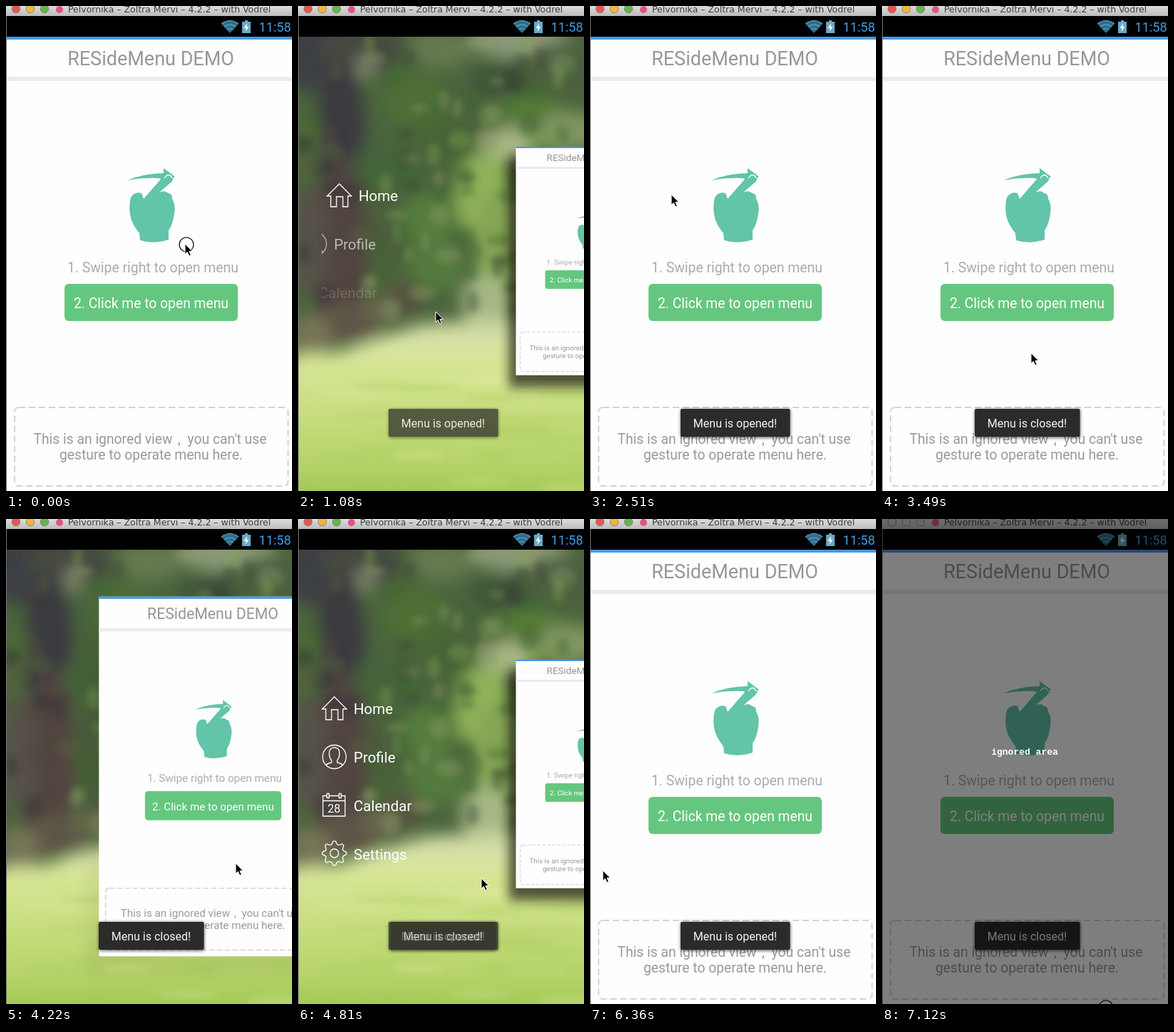
These frames come from a looping animation (401x679 px, 8 s). An HTML page:

```html
<!DOCTYPE html>
<html lang="en">
<head>
<meta charset="utf-8">
<title>Side menu demo</title>
<style>
  html, body { margin: 0; width: 100%; height: 100%; overflow: hidden; background: #fff; }
  svg { position: absolute; left: 0; top: 0; width: 401px; height: 679px; font-family: Roboto, sans-serif; }
  #wood { will-change: transform; }
  .mid { text-anchor: middle; }
  .line { fill: none; stroke: #fff; stroke-width: 1.3; }
</style>
</head>
<body>
<svg id="wood" viewBox="0 0 401 679">
  <defs>
    <linearGradient id="grass" gradientUnits="userSpaceOnUse" x1="0" x2="0" y1="430" y2="679">
      <stop offset="0" stop-color="#bfca9c"/>
      <stop offset=".18" stop-color="#dae5a6"/>
      <stop offset=".3" stop-color="#d5e592"/>
      <stop offset=".55" stop-color="#c8de7f"/>
      <stop offset=".85" stop-color="#b5d367"/>
      <stop offset="1" stop-color="#a3ca58"/>
    </linearGradient>
    <filter id="soft" x="-20%" y="-20%" width="140%" height="140%"><feGaussianBlur stdDeviation="11"/></filter>
    <filter id="fine" x="-20%" y="-20%" width="140%" height="140%"><feGaussianBlur stdDeviation="5"/></filter>
  </defs>
  <rect width="401" height="679" fill="#4a643c"/>
  <g filter="url(#soft)">
    <g id="trees"></g>
    <path d="M-60 492L60 484 120 462 180 444 300 436 460 436V760H-60Z" fill="url(#grass)"/>
  </g>
  <g id="leaves" filter="url(#fine)"></g>
  <g id="blades" filter="url(#fine)"></g>
</svg>

<svg id="stage" viewBox="0 0 401 679">
  <defs>
    <clipPath id="listBox"><rect x="33" y="230" width="260" height="270"/></clipPath>
    <linearGradient id="bar" x2="0" y2="1"><stop offset="0" stop-color="#dcdcdc"/><stop offset="1" stop-color="#bcbcbc"/></linearGradient>
    <filter id="shade" x="-20%" y="-20%" width="140%" height="140%"><feGaussianBlur stdDeviation="15"/></filter>
    <filter id="glow" x="-20%" y="-40%" width="140%" height="180%"><feGaussianBlur stdDeviation="2"/></filter>
  </defs>

  <g clip-path="url(#listBox)" id="list" fill="#fff" font-size="20.5">
    <g>
      <path class="line" d="M34 266L51 249 68 266H63V281H56V267H47V281H39V266Z"/>
      <text x="78" y="273">Home</text>
    </g>
    <g>
      <circle class="line" cx="51" cy="333" r="16.5"/>
      <path class="line" d="M39 345Q41 342 47 341V338Q43 333 44 326Q45 320 51 320T58 326Q59 333 55 338V341Q61 342 63 345"/>
      <text x="78" y="341">Profile</text>
    </g>
    <g>
      <path class="line" d="M35 387.500H40M44 387.500H57M61 387.500H66V416H35V387M35 394.500H66M40.500 384.500h3v6h-3zM57.500 384.500h3v6h-3z"/>
      <text class="mid" x="50.500" y="411" font-size="16">28</text>
      <text x="78" y="409">Calendar</text>
    </g>
    <g>
      <path class="line" id="gear"/>
      <circle class="line" cx="51" cy="468" r="6"/>
      <text x="78" y="477">Settings</text>
    </g>
  </g>

  <g id="panel">
    <rect id="shadow" x="-20" y="72" width="460" height="645" fill="#15160c" filter="url(#shade)"/>
    <rect y="43" width="406" height="640" fill="#fefefe"/>
    <rect y="43" width="406" height="4" fill="#4a98e6"/>
    <rect y="99" width="406" height="6" fill="#ebebeb"/>
    <text class="mid" x="203" y="83" font-size="27" fill="#979797">RESideMenu DEMO</text>
    <g fill="#62c4a9">
      <path d="M170 244Q195 234 221 234L221 227 237 239 226 245 214 241Q192 240 170 244Z"/>
      <path d="M220 239Q229 232 234 238 236 243 230 248L215 261Q223 257 227 262 233 262 233 270 238 278 236 290 234 306 228 314L228 327Q207 334 188 328L187 318Q176 305 174 292 172 279 175 268 181 259 190 262L193 270Z"/>
      <path d="M222 241Q228 232 233 241" fill="none" stroke="#fff" stroke-width="1.300"/>
    </g>
    <text class="mid" x="206" y="373" font-size="19.400" fill="#ababab">1. Swipe right to open menu</text>
    <rect id="button" x="82" y="389" width="243" height="52" rx="6"/>
    <text class="mid" x="203.500" y="423" font-size="19.300" fill="#fff">2. Click me to open menu</text>
    <rect x="12" y="562" width="383.500" height="110" rx="6" fill="none" stroke="#d3d3d3" stroke-width="2" stroke-dasharray="9 5"/>
    <g font-size="19.300" fill="#999">
      <text x="38.500" y="613">This is an ignored view</text>
      <text x="241" y="613">,</text>
      <text x="254.500" y="613">you can't use</text>
      <text class="mid" x="203.500" y="635">gesture to operate menu here.</text>
    </g>
  </g>

  <rect y="14" width="401" height="29"/>
  <rect width="401" height="14" fill="url(#bar)"/>
  <g id="lights" stroke="#777" stroke-width=".8">
    <circle cx="14" cy="4" r="5.800"/><circle cx="34" cy="4" r="5.800"/><circle cx="54" cy="4" r="5.800"/>
  </g>
  <circle cx="75" cy="5" r="5" fill="#e0528d"/>
  <text x="87" y="9" font-size="12.500" fill="#3c3c3c" style="font-family:'DejaVu Sans',sans-serif">Pelvornika – Zoltra Mervi – 4.2.2 – with Vodrel</text>
  <path d="M302 25Q314 16 326 25L314 38Z" fill="#2c6e90"/>
  <path d="M302 25Q314 16 326 25M306 29Q314 23 322 29M310 33Q314 30 318 33" fill="none" stroke="#6fa9c4" stroke-width="1.200"/>
  <path d="M331 22H335V20H339V22H343V38H331Z" fill="#69a9c8"/>
  <path d="M338 24L333.500 31H336.500L335.500 36 340.500 29H337.500Z" fill="#fff"/>
  <text x="354.500" y="36" font-size="18.200" fill="#3f9ce2">11:58</text>
  <path d="M.5 14V679" stroke="#777"/>

  <g id="toasts" font-size="16" fill="#f4f4f4">
    <g><rect x="127" y="564.500" width="154" height="40" rx="3" fill="#000" opacity=".6" filter="url(#glow)"/>
      <rect x="127" y="564" width="153.500" height="39" rx="2" fill="#2b2b2b"/>
      <text class="mid" x="203.500" y="590">Menu is opened!</text></g>
    <g><rect x="130" y="564.500" width="148" height="40" rx="3" fill="#000" opacity=".6" filter="url(#glow)"/>
      <rect x="130" y="564" width="147.500" height="39" rx="2" fill="#2b2b2b"/>
      <text class="mid" x="203.500" y="590">Menu is closed!</text></g>
  </g>

  <g id="cursor">
    <circle id="ring" cx="2" cy="1" r="10" fill="none" stroke="#000" stroke-width="1.200"/>
    <path d="M0 0V14.500L3.300 11.500 5.800 17 8.300 16 5.900 10.600H10.500Z" stroke="#fff"/>
  </g>

  <g id="dim">
    <rect width="401" height="679" opacity=".5"/>
    <text class="mid" x="200" y="330" font-size="13" font-weight="bold" fill="#fff" style="font-family:'Liberation Mono',monospace">ignored area</text>
  </g>
</svg>

<script>
const LOOP = 8000, PIVOT_X = 611, PIVOT_Y = 351, DIM_AT = 7120;
const $ = id => document.getElementById(id);
const set = (el, name, value) => el.setAttribute(name, value);
const clamp = v => Math.max(0, Math.min(1, v));
const linear = p => p;
const smooth = p => p * p * (3 - 2 * p);

// Interpolates rows of [time, ...values].
function track(t, rows, ease = linear) {
  const next = rows.findIndex(row => row[0] > t);
  if (next === 0) return rows[0].slice(1);
  if (next < 0) return rows[rows.length - 1].slice(1);
  const a = rows[next - 1], b = rows[next], p = ease((t - a[0]) / (b[0] - a[0]));
  return a.slice(1).map((v, i) => v + (b[i + 1] - v) * p);
}

const SCALE = [[850, 1], [910, .77], [980, .6], [1070, .5], [1670, .5], [2450, .987], [2509, .987], [2510, 1],
  [3880, 1], [4220, .7875], [4270, .75], [4350, .59], [4460, .5], [5580, .5], [5930, .6005],
  [5980, .64], [6100, .85], [6300, 1]];
const POINTER = [[0, 251, 333], [30, 251, 333], [700, 193, 428], [1100, 193, 428], [1640, 373, 290],
  [1690, 373, 290], [2450, 114, 264], [2830, 114, 264], [3000, 88, 300], [3490, 209, 486], [3880, 209, 486],
  [4220, 322, 482], [4730, 322, 482], [4810, 257, 503], [5150, 71, 495], [5580, 71, 495], [5930, 18, 492],
  [6420, 18, 492], [7080, 312, 683]];
const OPENED = [[950, 0], [1130, 1], [2850, 1], [3250, 0], [4560, 0], [4890, 1], [6420, 1], [6850, 0]];
const CLOSED = [[2850, 0], [3250, 1], [4700, 1], [5000, 0], [6420, 0], [6850, 1]];
const SLIDE = [[0, -52], [30, -49], [110, -28], [190, 7], [300, 0]];
const LIGHTS = ['#e8574e', '#eeb73c', '#62b74a'];

const TREES = [
  [20, 60, 70, 60, '#3e3f44'], [90, 60, 60, 30, '#44493f'], [200, 60, 45, 28, '#66784f'], [310, 48, 70, 26, '#8b9a76'],
  [290, 105, 45, 24, '#40503b'], [375, 90, 55, 40, '#4d603f'], [95, 85, 14, 18, '#7d826a'], [165, 135, 45, 36, '#4d6f36'],
  [320, 145, 50, 22, '#527a37'], [380, 175, 45, 28, '#809560'], [60, 170, 34, 90, '#3b3a40'], [15, 180, 20, 28, '#4e6934'],
  [215, 190, 40, 30, '#466337'], [120, 230, 45, 35, '#45633a'], [295, 195, 38, 26, '#a6b581'], [260, 265, 40, 60, '#8fb158'],
  [290, 340, 45, 85, '#86a557'], [185, 300, 40, 38, '#557d3d'], [195, 365, 40, 36, '#527a3d'], [110, 320, 34, 60, '#4b5f3a'],
  [60, 340, 38, 130, '#514540'], [18, 330, 26, 80, '#56514a'], [70, 440, 50, 30, '#5d5546'], [18, 460, 30, 28, '#777457'],
  [150, 410, 26, 26, '#575441'], [265, 415, 36, 40, '#a5b884'], [115, 425, 22, 20, '#696b4b']
];

function addEllipse(parent, [cx, cy, rx, ry, fill], opacity = 1) {
  const el = document.createElementNS('http://www.w3.org/2000/svg', 'ellipse');
  Object.entries({ cx, cy, rx, ry, fill, opacity }).forEach(([k, v]) => set(el, k, v));
  parent.append(el);
}

function paintWood() {
  let seed = 11;
  const random = () => (seed = seed * 16807 % 2147483647) / 2147483647;
  const pick = list => list[Math.floor(random() * list.length)];
  TREES.forEach(tree => addEllipse($('trees'), tree));
  for (let i = 0; i < 110; i++) {
    const x = random() * 401, y = 45 + random() * 385;
    const shades = x < 90 ? ['#2f2d35', '#4d4540', '#5a6441'] : ['#37452f', '#3f6a30', '#7fa04f', '#8c9c6c'];
    addEllipse($('leaves'), [x, y, 6 + random() * 12, 6 + random() * 10, pick(shades)], .4);
  }
  for (let i = 0; i < 24; i++) {
    const y = 515 + random() * 165;
    addEllipse($('blades'), [random() * 401, y, 30 + random() * 60, 3 + random() * 5, pick(['#e0eba0', '#a5c95a'])], .3);
  }
}

function gearPath() {
  const points = [];
  for (let i = 0; i < 32; i++) {
    const angle = (i - .5) * Math.PI / 16, r = i % 4 < 2 ? 17 : 13;
    points.push((51 + r * Math.sin(angle)).toFixed(1) + ' ' + (468 - r * Math.cos(angle)).toFixed(1));
  }
  return 'M' + points.join('L') + 'Z';
}

function draw(t) {
  const [s] = track(t, SCALE);
  set($('panel'), 'transform', `matrix(${s} 0 0 ${s} ${PIVOT_X * (1 - s)} ${PIVOT_Y * (1 - s)})`);
  set($('shadow'), 'opacity', .7 * clamp((1 - s) * 2) ** 3);
  set($('button'), 'fill', t >= 790 && t < 870 ? '#4fb36b' : '#65c77f');

  const start = t < 2510 ? 890 : 4250;
  const fade = t < 2510 ? 1 : 1 - clamp((t - 5970) / 150);
  [...$('list').children].forEach((item, i) => {
    const age = t - start - 80 * i;
    set(item, 'opacity', clamp(age / 178) * fade);
    set(item, 'transform', `translate(${track(age, SLIDE)[0]} 0)`);
  });

  const [opened, closed] = $('toasts').children;
  set(opened, 'opacity', track(t, OPENED)[0]);
  set(closed, 'opacity', track(t, CLOSED)[0]);

  const dragging = (t > 1690 && t < 2450) || (t > 3880 && t < 4220) || (t > 5580 && t < 5930);
  set($('cursor'), 'transform', `translate(${track(t, POINTER, dragging ? linear : smooth)})`);
  set($('ring'), 'visibility', t < 30 || t > 7090 ? 'visible' : 'hidden');

  const dimmed = t >= DIM_AT;
  set($('dim'), 'visibility', dimmed ? 'visible' : 'hidden');
  [...$('lights').children].forEach((light, i) => set(light, 'fill', dimmed ? '#d0d0d0' : LIGHTS[i]));
}

paintWood();
set($('gear'), 'd', gearPath());
const began = performance.now();
function tick() {
  draw((performance.now() - began) % LOOP);
  requestAnimationFrame(tick);
}
tick();
</script>
</body>
</html>
```
